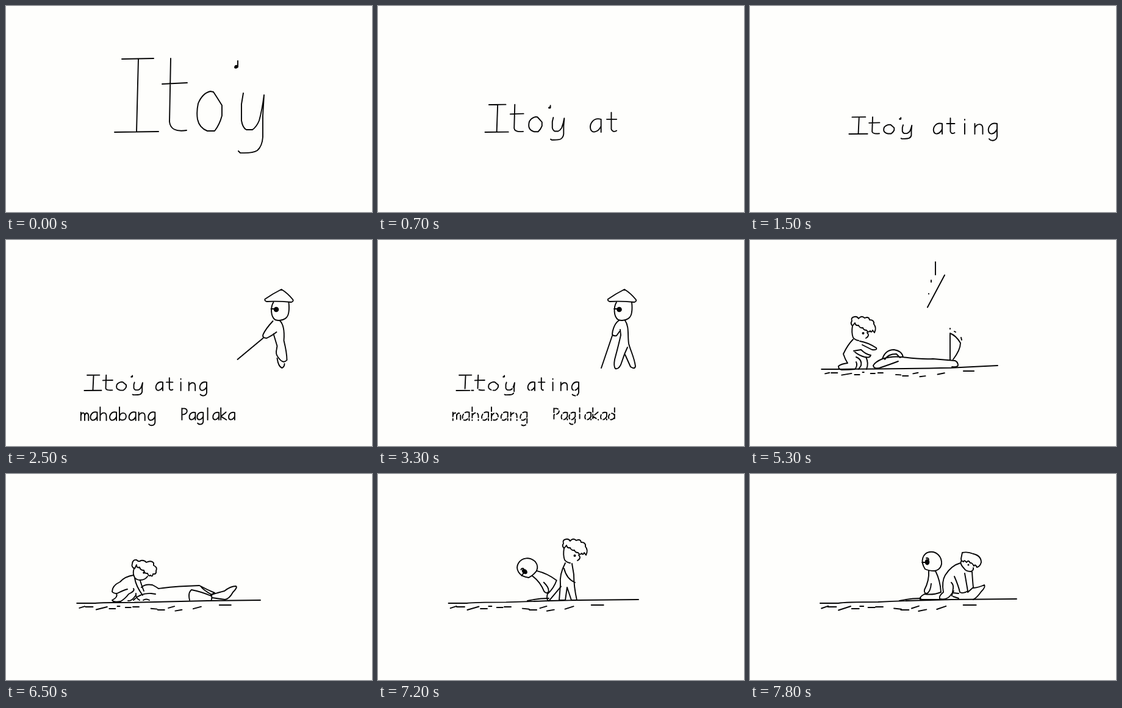
An HTML page for the animation above (8 s loop, 600 by 338 pixels).

```html
<!DOCTYPE html>
<html lang="tl">
<head>
<meta charset="utf-8">
<title>Hand-drawn walk</title>
<style>
html, body { margin: 0; width: 100%; height: 100%; overflow: hidden; background: #fefefc; }
svg { display: block; width: 100vw; height: 100vh; }
path { fill: none; stroke: #050505; stroke-width: 1.9; stroke-linecap: round; stroke-linejoin: round; vector-effect: non-scaling-stroke; }
.solid { fill: #050505; }
</style>
</head>
<body>
<svg id="stage" viewBox="0 0 600 338"></svg>
<script>
const LOOP = 8000;
const stage = document.getElementById('stage');

// Handwriting, baseline at 0
const BOWL = 'M15-17C4-20 0-10 1-5C2 2 11 1 15-8';
const GLYPHS = {
  a: BOWL + 'M15-17L15 0',
  b: 'M1-28L1 0M1-8C3-18 15-18 15-8C14 1 4 1 1-4',
  d: 'M15-9C12-19 1-16 1-6C2 2 11 1 15-6M15-28L15 0',
  g: BOWL + 'M15-17L15 4C14 12 5 12 2 8',
  h: 'M1-28L1 0M1-10C5-18 14-18 14-9L14 0',
  i: 'M7-17L7 0M7-24L7-23',
  k: 'M1-28L1 0M13-18L1-8L14 0',
  l: 'M7-28L7 0',
  m: 'M1-17L1 0M1-10C3-18 9-18 9-9L9 0M9-10C11-18 17-17 17-8L17 0',
  n: 'M1-17L1 0M1-10C5-18 14-18 14-9L14 0',
  P: 'M2-27L2 0M2-26C18-30 18-12 2-12',
  t: 'M6-26L6-4Q8 1 13-2M0-17L13-17'
};
const FIRST = 'M190 87L242 86M217 87L214 206M178 207L250 206' +
  'M270 86L268 190Q270 208 296 204M256 128L297 126' +
  'M340 141L335 140Q322 143 315 160Q312 174 314 186Q317 200 330 205L342 205Q350 195 354 180L354 163Q346 150 340 141' +
  'M389 143L386 161L386 188Q388 200 394 203L404 203Q411 198 415 188Q420 170 423 146L421 180L421 215Q420 230 412 237Q404 242 384 241L381 238';
const TICK = 'M380 90L380 100Q377 103 375 101Q375 97 379 98';

// Farmer
const HAT = 'M377 97Q390 88 404 81Q414 87 423 98Q424 101 420 102Q398 100 380 101Q376 100 377 97';
const FACE = 'M391 102C386 110 386 126 394 131Q397 132 400 132M416 102Q417 112 416 118C415 128 409 131 400 132M387 113L392 113';
const STRIDE = 'M395 132C386 138 384 152 384 155Q386 158 391 157L396 150' +
  'M405 132C412 142 409 155 411 170C414 182 420 192 422 207Q421 213 414 208L405 188' +
  'M397 147L398 156Q395 170 388 196Q386 207 389 211Q396 213 400 199Q404 186 409 176';
const CLOSED = 'M312 133Q300 146 296 155Q294 161 302 161Q312 156 318 151' +
  'M323 132Q332 140 330 165Q335 185 335 197Q329 204 321 193Q316 187 318 180L319 174L313 154' +
  'M319 194Q321 208 327 210Q331 208 331 203';
const FALLEN = 'M217 195Q222 180 236 180Q249 182 251 192M221 196Q226 187 240 187L246 193' +
  'M243 199Q230 204 212 210Q203 212 202 206Q205 200 217 195Q232 190 250 192Q280 196 300 195L336 198Q341 200 341 206Q339 209 331 208';
const KICK = 'M328 197L328 153Q338 157 345 169Q345 180 333 196M328 145v1M335 150l2 1M346 160l1 4';
const LYING = 'M222 186Q228 180 240 182Q246 185 250 188Q280 184 317 183Q330 190 342 195L336 198' +
  'M209 207Q220 195 238 196L245 197M213 196Q212 203 219 207M225 207q5-3 10 0' +
  'M319 184Q323 190 337 198Q338 206 336 208M301 207Q298 195 304 190Q320 193 336 200' +
  'M337 198Q350 194 358 192Q368 184 377 184Q380 186 372 194Q366 205 359 206L338 203';
const SITTING = 'M287 156C278 142 284 130 294 128C306 126 315 136 314 148Q312 157 303 159Q293 159 287 156' +
  'M282 145L287 145M289 138q3-1 4 2M293 159Q294 175 286 190Q285 196 290 196Q296 193 297 180' +
  'M304 159Q312 175 313 194Q300 199 286 197Q277 202 279 206L310 206';

// Child
const CHILD_HEAD = 'M168 141Q164 137 167 133Q165 127 171 126Q176 125 178 129Q183 123 188 128Q195 125 196 131Q204 131 203 138Q208 144 204 152L201 148' +
  'Q199 153 197 149Q194 153 191 148Q186 148 185 144Q180 145 178 140Q173 141 172 136L168 141' +
  'Q166 152 169 160Q172 164 178 165M192 152Q197 157 190 161';
const KNEEL = 'M169 163Q160 172 153 187Q156 196 160 202Q150 203 145 207Q145 212 150 213Q162 213 172 212Q177 206 174 200' +
  'M180 166Q193 168 207 177Q209 181 200 180L184 172M170 182L182 180Q190 188 198 189Q197 194 188 192Q180 190 172 184' +
  'M174 192Q184 196 182 206L178 212M190 192Q195 202 191 212';
const STAND = 'M170 146Q160 165 162 182L160 207L170 207L173 186L180 207L189 207Q184 185 184 165L181 147M168 155Q172 172 186 178';
const PULL = 'M211 155Q205 153 207 147Q208 140 214 141Q218 145 221 142Q227 141 230 145Q238 141 242 146L242 150Q249 153 246 159Q247 165 241 164Q240 170 237 166Q234 169 232 163Q227 164 226 158Q220 158 219 153Q214 155 214 149L211 155' +
  'M210 155Q207 163 211 170Q214 174 220 174Q228 174 232 168' +
  'M209 166Q195 168 187 177Q174 183 174 193Q176 196 182 196Q194 190 199 189' +
  'M181 196Q184 202 174 207Q176 211 188 209Q196 204 201 197Q212 192 209 188M200 208Q206 209 212 200' +
  'M211 171Q213 184 224 199M220 175Q223 185 226 192';
const PUSH = 'M346 139L348 129Q357 127 366 131Q379 134 379 145Q377 152 372 153Q369 147 367 151Q364 145 361 146Q358 140 355 145Q351 140 350 144Q346 143 346 139' +
  'M346 143Q344 148 351 155Q354 160 362 160Q367 158 366 154' +
  'M345 146Q330 150 320 166Q314 176 317 194Q309 200 311 205Q322 207 328 200L334 192M330 178Q334 182 333 188L331 200' +
  'M335 168Q342 184 344 194Q350 197 357 192Q355 180 352 163M364 160Q365 176 366 186L357 194M333 195L342 196M342 204L333 201' +
  'M366 187Q376 186 384 182Q387 185 379 193Q372 203 366 206';

// x, y, length, rise of each soil mark
const SOIL = [
  [125, 219, 6, 3], [135, 218, 9, 0], [152, 221, 15, 5], [173, 221, 7, 0], [186, 217, 1, 0],
  [199, 219, 6, 0], [211, 218, 7, 0], [240, 221, 7, -1], [251, 223, 8, 0], [268, 219, 7, 3],
  [279, 224, 8, 2], [308, 220, 10, 4], [350, 215, 16, 0]
];

// step, x, baseline, width, height, second word x, pitch
const LAYOUT = [
  [0, 177, 207, 1, 1, 347, 28], [3, 175, 207, .53, .4, 347, 28], [7, 175, 207, .53, .3, 347, 28],
  [9, 162, 210, .42, .23, 300, 22.5], [13, 128, 247, .39, .21, 245, 18]
];

const mix = (a, b, u) => a + (b - a) * u;

function keyed(rows, k) {
  if (k >= rows.at(-1)[0]) return rows.at(-1).slice(1);
  const j = rows.findIndex(r => r[0] > k), a = rows[j - 1], b = rows[j];
  return a.map((v, i) => mix(v, b[i], (k - a[0]) / (b[0] - a[0]))).slice(1);
}

const line = (d, attr = '') => `<path d="${d}" ${attr}/>`;
const group = (transform, body) => `<g transform="${transform}">${body}</g>`;
const move = (x, y, body) => group(`translate(${x} ${y})`, body);
const dot = (x, y, r) => `<circle class="solid" cx="${x}" cy="${y}" r="${r}"/>`;
const word = (text, x, y, pitch, scale, attr) => [...text].map((c, i) =>
  group(`translate(${x + i * pitch} ${y}) scale(${scale})`, line(GLYPHS[c], attr))).join('');

function writing(k) {
  const [x, y, sx, sy, x2, pitch] = keyed(LAYOUT, k);
  const dash = (len, gap) => `stroke-dasharray="${len} ${gap}"`;
  const top = k < 20 ? '' : k < 21 ? dash(22, 3) : dash(6, 5);
  const low = k < 18 ? '' : k < 20 ? dash(12, 3) : k < 21 ? dash(7, 3.5) : dash(4, 5);
  const count = Math.max(0, (k - 10) * 3);
  return group(`translate(${x} ${y}) scale(${sx} ${sy}) translate(-177 -207)`,
      line(FIRST, top) + line(TICK, 'class="solid"')) +
    word('ating'.slice(0, Math.max(0, k - 2)), x2, y, pitch, pitch / 22.5, top) +
    word('mahabang'.slice(0, count), 122, 296, 15.8, .78, low) +
    word('Paglakad'.slice(0, Math.max(0, count - 8)), 287, 295, 12.9, .7, low);
}

function ground(k) {
  const p = Math.max(0, (k - 27) / 20);
  const [end, h] = keyed([[22, 388, 209], [27, 388, 209], [32, 406, 206], [39, 417, 207], [47, 437, 205]], k);
  const x = 118 - 3 * p, dip = 212 - 2 * p;
  const marks = SOIL.map(([mx, my, len, rise]) => {
    const left = mx - 8 * p * (1 - (mx - 120) / 240);
    return `M${left} ${my + p * rise / 2}l${len + 5 * p} ${-rise * (.3 + p)}`;
  }).join('');
  return line(`M${x} 212L${x + 30} 212Q${x + 40} ${dip} 210 ${dip}Q280 ${dip - 3 * p} 330 ${mix(211, 206, p)}L${end} ${h}`) + line(marks);
}

const face = () => line(FACE) + dot(395.5, 114, 4.3);

function walker(k) {
  const dx = k < 20 ? (20 - k) * 9.5 : k < 28 ? -(k - 20) * 78 / 7 : -84;
  const open = k % 4 < 2 && k < 28;
  return move(dx, 0, line(HAT) + face() +
    (open ? line(STRIDE + 'M384 157L366 210') : move(78, 0, line(CLOSED + 'M296 161L254 196'))));
}

const stumbler = (angle, hat) => group(`rotate(${angle} 330 208)`,
  move(-78, 0, (hat ? line(HAT) : '') + face()) + line(CLOSED));

function stick(k) {
  const [x, y, turn] = keyed([[29, 262, 150, -40], [30, 285, 100, -100], [31, 300, 52, -130], [32, 305, 84, -62], [33, 300, 140, -30], [34, 296, 205, 0]], k);
  return group(`translate(${x} ${y}) rotate(${turn})`, line('M-30 0L30 0')) +
    (k === 32 ? line('M304 36L304 57M297 66v3M293 88v.5') : '');
}

const child = (body, dx, dy = 0) => move(dx, dy, line(CHILD_HEAD) + dot(185.5, 153, 2)) + move(dx, 0, line(body));
const puller = dx => move(dx, 0, line(PULL) + dot(226, 162, 1.8));
const sitter = angle => group(`rotate(${angle} 282 206)`,
  line(SITTING) + `<ellipse class="solid" cx="290.5" cy="144.5" rx="3.8" ry="5"/>`) + line('M245 208Q262 204 280 204');

function rescue(k) {
  let out = '';
  if (k < 31) out += stumbler(k < 30 ? -35 : -68, k < 30);
  else if (k < 34) out += line(FALLEN + KICK);
  else if (k < 43) out += line(LYING);
  else out += sitter([-50, -34, -15, -4, 0][k - 43]);

  if (k === 30 || k === 31) out += group(`translate(${-120 - 10 * (k - 30)} ${20 - 45 * (k - 30)}) rotate(-20 400 92)`, line(HAT));
  if (k < 35) out += stick(k);

  if (k >= 30 && k < 35) out += child(KNEEL, k < 32 ? (k - 32) * 20 : (k - 32) * 4);
  else if (k >= 35 && k < 42) out += puller(k < 39 ? (k - 39) * 5 : (k - 39) * 2);
  else if (k >= 42 && k < 45) out += child(STAND, 95 + (k - 42) * 42, -19);
  else if (k >= 45) out += move((47 - k) * 3, 0, line(PUSH) + dot(358, 149, 1.5));
  return out;
}

function draw(k) {
  let out = '';
  if (k < 22) out += writing(k);
  else out += ground(k);
  if (k >= 14 && k < 29) out += walker(k);
  if (k >= 29) out += rescue(k);
  stage.innerHTML = out;
}

// Six drawings a second, snapped to tenths
const stepAt = t => Math.floor((Math.floor(t / 100) + .5) * .6);

let shown = -1;
const start = performance.now();
function tick() {
  const k = stepAt((performance.now() - start) % LOOP);
  if (k !== shown) draw(shown = k);
  requestAnimationFrame(tick);
}
tick();
</script>
</body>
</html>
```
